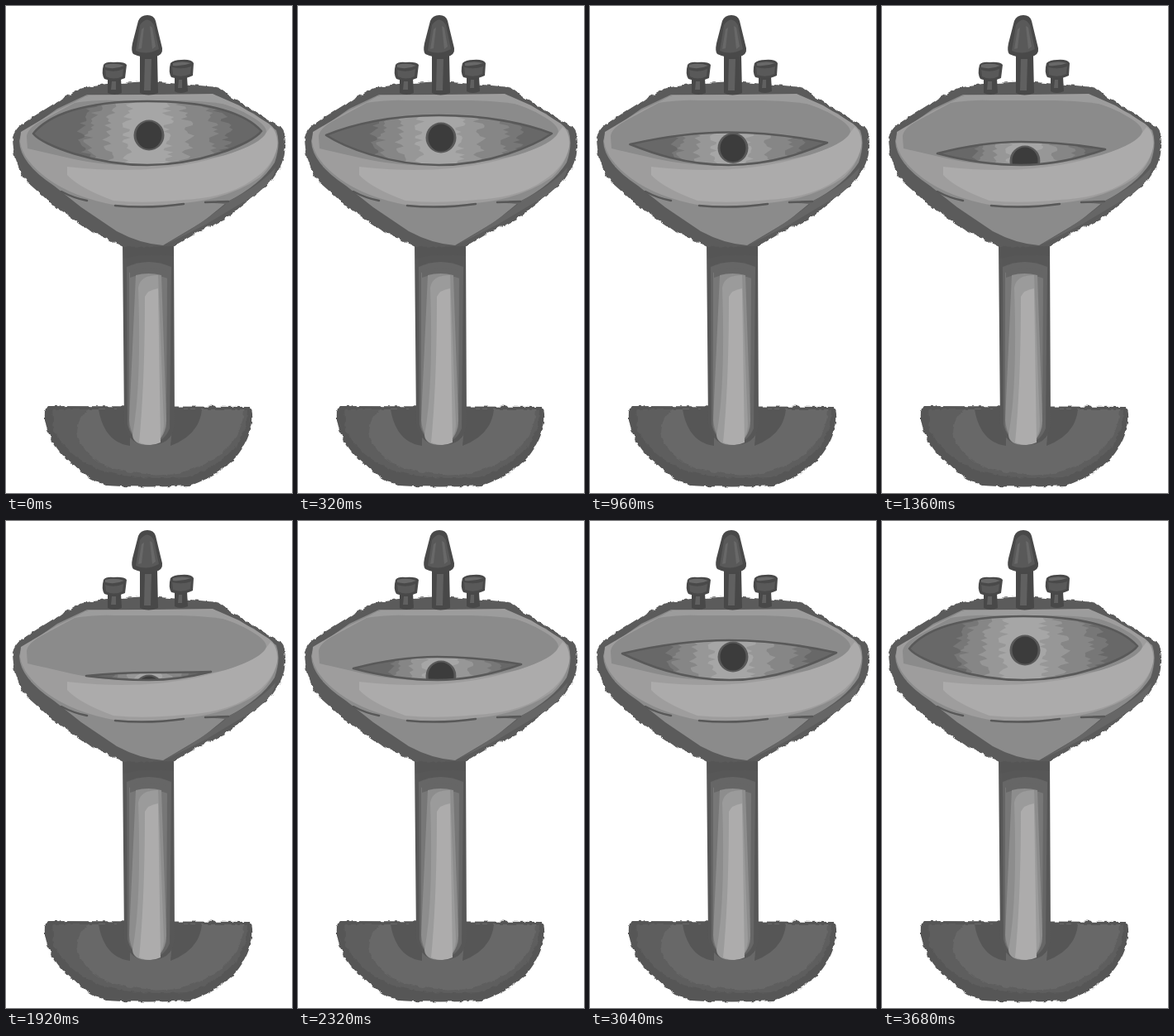
Animation, 346 px wide and 588 px high, one loop 3.76 s. Source, as an HTML page:

```html
<!DOCTYPE html>
<html lang="en">
<head>
<meta charset="utf-8">
<title>Blinking sink</title>
<style>
  html, body { margin: 0; width: 100%; height: 100%; overflow: hidden; background: #fff; }
  svg { display: block; width: 100%; height: 100%; }
</style>
</head>
<body>
<svg viewBox="0 0 346 588">
  <defs>
    <filter id="rough" x="-5%" y="-5%" width="110%" height="110%" color-interpolation-filters="sRGB">
      <feTurbulence type="fractalNoise" baseFrequency=".13" numOctaves="2" seed="4"/>
      <feDisplacementMap in="SourceGraphic" scale="5" xChannelSelector="R" yChannelSelector="G"/>
    </filter>
    <clipPath id="opening"><path id="openingShape"/></clipPath>
  </defs>

  <!-- foot -->
  <g filter="url(#rough)">
    <path fill="#565656" d="M50 483L295 484Q299 488 298 502Q293 530 274 549Q252 570 222 579Q170 582 122 579Q98 571 80 553Q52 530 47 500Q46 486 50 483Z"/>
    <path fill="#5e5e5e" d="M56 487H292Q292 514 276 534Q250 561 218 569Q160 573 118 562Q75 545 58 514Z"/>
    <path fill="#686868" d="M101 487H288Q287 512 270 531Q248 556 208 564Q160 569 122 556Q91 540 86 516Q86 496 101 487Z"/>
  </g>
  <path fill="#565656" d="M112 487H150V531Q119 527 112 487ZM203 487H237Q234 518 199 531Z"/>

  <!-- pedestal -->
  <path fill="#575757" d="M141 286H203L204 506Q201 530 174 530Q148 531 143 505Z"/>
  <path fill="#666" d="M146 315Q172 303 200 315L198 510Q191 528 172 528Q152 527 147 505Z"/>
  <path fill="#555" d="M142 288H203V302Q172 298 142 305Z"/>
  <path fill="#777" d="M149 322Q172 313 195 322L194 508Q188 528 172 528Q154 527 149 508Z"/>
  <path fill="#666" d="M150 320Q172 312 196 320V329Q172 320 150 328Z"/>
  <path fill="#8d8d8d" d="M157 325Q172 321 188 325L194 500Q192 528 172 530Q152 528 149 500Z"/>
  <path fill="#9b9b9b" d="M160 340Q162 325 184 325L191 505Q190 528 172 530Q154 530 153 518Q164 460 160 340Z"/>
  <path fill="#adacac" d="M168 351Q171 343 184 341L187 527Q174 533 161 527Q168 455 168 351Z"/>

  <!-- basin -->
  <path filter="url(#rough)" fill="#5b5b5b" d="M82 104L97 97L122 94L172 91L224 95L256 98L270 108L331 146Q339 154 338 171Q337 190 322 210L297 232L265 257L234 272L204 290L142 291L100 270L60 243L26 213Q9 190 8 160Q9 150 21 141L58 118Z"/>
  <path fill="#8b8b8b" d="M18 155L62 124L98 107L248 107L300 130L327 150Q333 166 325 189Q309 215 267 237L239 260L190 289Q162 287 134 272L91 243L58 217Q17 190 16 163Z"/>
  <path fill="#9e9d9d" d="M18 152L62 126L100 108L250 106L282 120L318 142Q327 148 329 164Q327 188 307 207Q270 233 215 238Q163 244 130 240Q82 231 51 209Q20 186 17 164Z"/>
  <path fill="#acabab" d="M320 146Q329 151 328 170Q323 194 298 210Q270 231 215 234Q166 239 130 235Q89 220 74 204V194Q160 204 231 189Q287 177 312 157Z"/>
  <path fill="#8b8b8b" d="M25 158Q25 148 44 138L83 117Q97 111 120 111L225 111Q267 115 298 134Q315 144 315 152Q310 166 265 180Q215 192 172 193Q118 193 78 184L26 172Z"/>
  <path fill="#9c9c9c" d="M96 109H255L279 120Q245 115 210 114H130Q112 113 82 117Z"/>
  <path fill="#666" d="M240 237L270 235Q306 218 326 195Q324 212 300 229L243 263Q218 276 193 288Q237 263 266 239Z"/>
  <g fill="none" stroke="#585858" stroke-width="2.5" stroke-linecap="round">
    <path d="M67 224Q82 232 98 235M132 241Q172 245 215 239M241 237L269 236"/>
  </g>

  <!-- eye -->
  <g clip-path="url(#opening)">
    <rect width="346" height="220" fill="#686868"/>
    <g id="rings"></g>
    <g id="drain">
      <ellipse rx="18.5" ry="18.5" fill="#595959"/>
      <ellipse rx="15.5" ry="16.5" fill="#3c3c3c"/>
    </g>
  </g>
  <path id="lid" fill="none" stroke="#595959" stroke-width="2.6" stroke-linejoin="round"/>

  <!-- taps -->
  <g id="taps">
    <path fill="#484848" d="M162 60H183L184 105Q172 110 162 105ZM123 87H139L140 105Q131 109 123 105ZM204 85H219L220 103Q211 107 204 103Z"/>
    <path fill="#606060" d="M168 64H176L175 102H167ZM128 91H133V101H127ZM209 89H213V99H208Z"/>
    <path fill="#494949" d="M160 18Q163 11 171 11Q179 11 181 18L189 51Q190 59 181 61Q167 64 154 58Q151 55 153 45ZM118 71Q121 67 130 68Q143 67 146 71L144 87Q132 93 119 88Q115 82 118 71ZM199 69Q203 65 212 65Q224 64 227 69L226 84Q214 90 200 86Q196 80 199 69Z"/>
    <path fill="#595959" d="M162 23Q171 10 179 23L185 52Q170 60 157 54ZM120 77Q131 81 142 76L141 85Q130 90 121 85ZM201 74Q214 77 224 73L223 82Q213 87 202 83Z"/>
    <path fill="#686868" d="M164 28L167 26L164 51L160 52ZM174 24L177 26L181 49L177 52ZM120 71Q132 68 143 72Q132 77 120 74ZM202 69Q214 66 224 69Q213 73 202 72Z"/>
  </g>
</svg>
<script>
const STEP = 80, FRAMES = 47;
// time, left corner x y, right corner x y, upper lid y, drain y
const POSES = [
  [0, 33, 154, 309, 151, 115, 156],
  [320, 34, 156, 307, 154, 132, 159],
  [640, 39, 160, 298, 159, 144, 164],
  [880, 45, 165, 291, 163, 150, 169],
  [1040, 52, 169, 283, 167, 155, 174],
  [1360, 67, 178, 270, 173, 164, 187],
  [1760, 97, 187, 248, 182, 183, 204],
  [1840, 101, 188, 245, 183, 186, 207]
];
const CENTER = 173, BOTTOM = 192;
const byId = id => document.getElementById(id);
const mix = (a, b, k) => a + (b - a) * k;

let seed = 11;
const random = () => (seed = seed * 16807 % 2147483647) / 2147483647;

// Streaky ring around the drain: jagged on both sides, narrower at the ends
function ring(left, right, color) {
  const side = width => {
    const points = [];
    for (let y = -42; y <= 42; y += 2.5)
      points.push([width * (Math.sqrt(1 - (y / 62) ** 2) + (random() - .5) * 14 / Math.abs(width)), y]);
    return points;
  };
  const points = [...side(-left), ...side(right).reverse()];
  return `<polygon fill="${color}" points="${points.map(p => p.map(n => n.toFixed(1))).join(' ')}"/>`;
}
byId('rings').innerHTML =
  ring(83, 95, '#777') + ring(73, 80, '#868686') + ring(51, 48, '#979797') + ring(28, 25, '#a6a6a6');

function poseAt(time) {
  const next = Math.max(1, POSES.findIndex(p => p[0] >= time));
  const a = POSES[next - 1], b = POSES[next];
  return a.map((v, i) => mix(v, b[i], (time - a[0]) / (b[0] - a[0])));
}

function eyePath(lx, ly, rx, ry, top) {
  const wide = Math.max(0, (143 - top) / 28);
  const mid = (lx + rx) / 2;
  const half = (rx - lx) / 2;
  const reach = half * mix(.3, .13, wide);
  const flat = half * mix(.32, .57, wide);
  const low = half * mix(.2, .08, wide);
  const bend = (y, edge, k) => y + (edge - y) * k;
  return `M${lx} ${ly}
    C${lx + reach} ${bend(ly, top, .56)} ${mid - flat} ${top} ${mid} ${top}
    S${rx - reach} ${bend(ry, top, .56)} ${rx} ${ry}
    C${rx - low} ${bend(ry, BOTTOM, .38)} ${mid + half * .45} ${BOTTOM} ${mid} ${BOTTOM}
    S${lx + low} ${bend(ly, BOTTOM, .38)} ${lx} ${ly}Z`;
}

function draw(now) {
  const frame = Math.floor(now / STEP) % FRAMES;
  const [, lx, ly, rx, ry, top, drainY] = poseAt(Math.min(frame, FRAMES - 1 - frame) * STEP);
  const path = eyePath(lx, ly, rx, ry, top);
  byId('openingShape').setAttribute('d', path);
  byId('lid').setAttribute('d', path);
  byId('drain').setAttribute('transform', `translate(${CENTER} ${drainY})`);
  byId('rings').setAttribute('transform', `translate(${CENTER} ${drainY}) scale(${(rx - lx) / 276} 1)`);
  requestAnimationFrame(() => draw(performance.now()));
}
draw(0);
</script>
</body>
</html>
```
